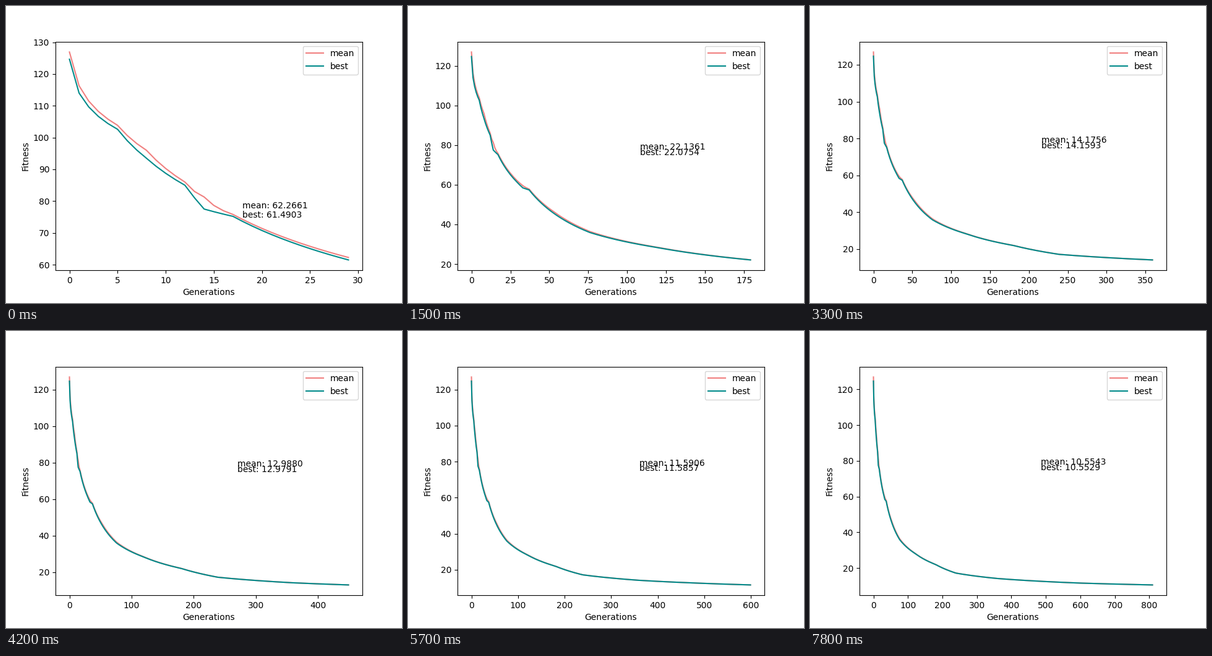
Write a matplotlib script that moves like this. It is 640x480 px and loops after 8 s.

```python
import numpy as np
import matplotlib.pyplot as plt
from matplotlib.animation import FuncAnimation

LOOP_MS, TICK_MS, HOLD_TICKS = 8000, 100, 3
GENS_PER_STEP, LAST_GEN = 30, 810
LABEL_AT = 0.6  # label anchor as a share of the run length and starting fitness
LABEL_GAP = 3

# Key points: generation, best fitness, mean minus best
KEYS = np.array([
    (0, 124.65, 2.26), (1, 114.0, 2.3), (5, 102.6, 1.25), (8, 93.5, 2.5),
    (12, 85.0, 1.0), (14, 77.5, 3.8), (17, 75.2, 0.6), (29, 61.4903, 0.7758),
    (33, 58.4, 1.1), (37, 57.4, 0.4), (53, 45.5, 0.8), (76, 35.9, 0.5),
    (119, 28.3580, 0.1420), (180, 22.0, 0.06), (239, 17.1793, 0.0292),
    (359, 14.1593, 0.0163), (449, 12.9791, 0.0089), (599, 11.5857, 0.0049),
    (809, 10.5529, 0.0014),
])


def power_curve(x, key_x, key_y):
    """Join key points with power-law segments."""
    return np.exp(np.interp(np.log1p(x), np.log1p(key_x), np.log(key_y)))


gens = np.arange(LAST_GEN)
key_gens, key_best, key_gap = KEYS.T
best = power_curve(gens, key_gens, key_best)
mean = best + power_curve(gens, key_gens, key_gap)

plt.rcParams["font.family"] = "DejaVu Sans"
fig, ax = plt.subplots(figsize=(6.4, 4.8), dpi=100)
label_y = LABEL_AT * best[0]
series = []
for name, color, values, y in (("mean", "lightcoral", mean, label_y + LABEL_GAP),
                               ("best", "darkcyan", best, label_y)):
    line, = ax.plot([], [], color=color, label=name)
    series.append((name, values, line, ax.text(0, y, "")))
ax.set_xlabel("Generations")
ax.set_ylabel("Fitness")
ax.legend(loc="upper right")


def update(tick):
    count = GENS_PER_STEP * (tick // HOLD_TICKS + 1)
    for name, values, line, text in series:
        line.set_data(gens[:count], values[:count])
        text.set_x(LABEL_AT * count)
        text.set_text(f"{name}: {values[count - 1]:.4f}")
    ax.relim()
    ax.autoscale_view()


anim = FuncAnimation(fig, update, frames=LOOP_MS // TICK_MS, interval=TICK_MS,
                     init_func=lambda: update(0), repeat=True, repeat_delay=0)
plt.show()
```
